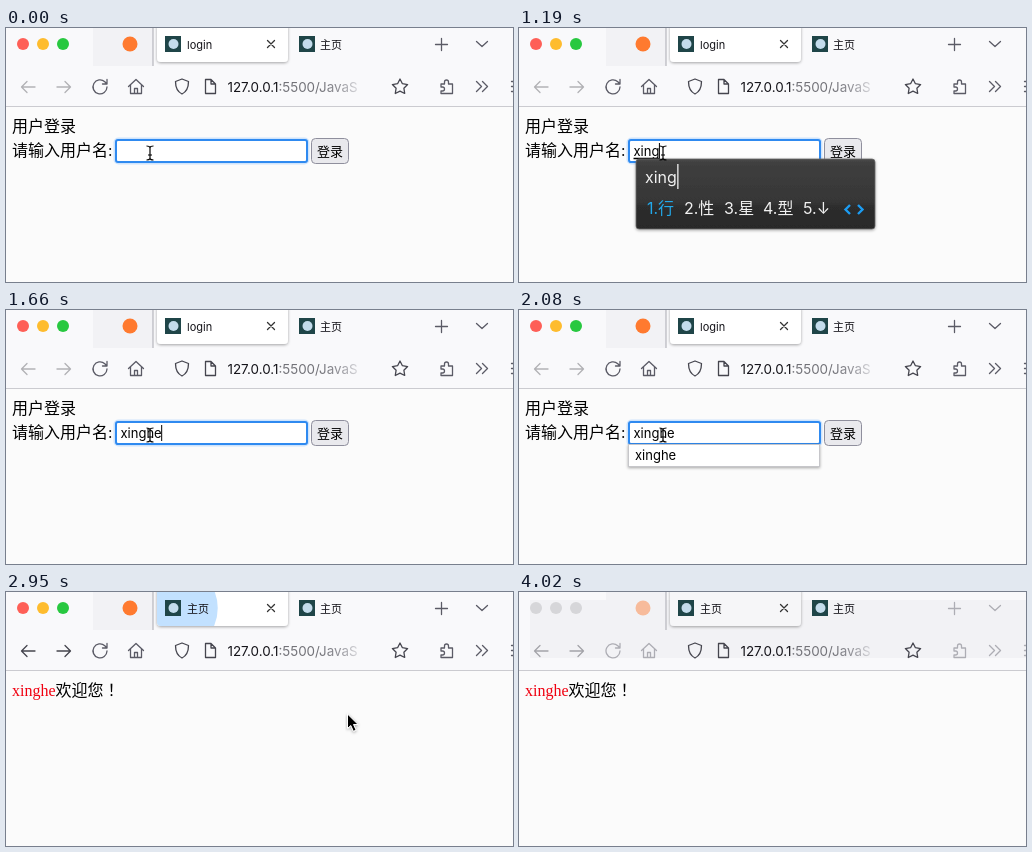
Recreate the animation shown at these times as an HTML page. Size 507 by 254 pixels, loop 4.12 s.

```html
<!DOCTYPE html>
<html lang="zh-CN">
<head>
<meta charset="utf-8">
<title>login</title>
<style>
html, body { margin: 0; width: 100%; height: 100%; overflow: hidden; background: #fbfbfb; }
svg { display: block; width: 100vw; height: 100vh; }
text { white-space: pre; }
.ui { font-family: Inter, "Noto Sans CJK SC", sans-serif; }
.page { font: 16px "Liberation Serif", "Noto Sans CJK SC", serif; }
.wide { font-family: "Noto Sans CJK TC", sans-serif; }
.ico { fill: none; stroke: #5b5b66; stroke-width: 1.3; stroke-linecap: round; stroke-linejoin: round; }
.bar { stroke: #45454e; }
</style>
</head>
<body>
<svg viewBox="0 0 507 254" xmlns="http://www.w3.org/2000/svg">
  <defs>
    <linearGradient id="dark" x2="0" y2="1">
      <stop offset="0" stop-color="#4a4a4a"/>
      <stop offset=".06" stop-color="#3f3f3f"/>
      <stop offset=".6" stop-color="#363636"/>
      <stop offset=".68" stop-color="#2d2d2d"/>
      <stop offset="1" stop-color="#282828"/>
    </linearGradient>
    <linearGradient id="fade" gradientUnits="userSpaceOnUse" x1="312" x2="355" y1="0" y2="0">
      <stop offset="0" stop-color="#737379"/>
      <stop offset=".5" stop-color="#929298"/>
      <stop offset="1" stop-color="#e4e4e8"/>
    </linearGradient>
    <filter id="soft" x="-20%" y="-40%" width="140%" height="190%">
      <feDropShadow dx="0" dy="1" stdDeviation="1.6" flood-opacity=".35"/>
    </filter>
    <clipPath id="tabClip"><rect x="151" y="-4" width="131" height="38" rx="4"/></clipPath>
    <clipPath id="urlClip"><rect x="215" y="44" width="138" height="30"/></clipPath>
    <g id="favicon">
      <rect width="16" height="16" fill="#1f4548"/>
      <circle cx="8.5" cy="8" r="5" fill="#c4dcec"/>
    </g>
  </defs>

  <rect width="507" height="254" fill="#fbfbfb"/>
  <rect width="507" height="78" fill="#f9f9fb"/>
  <rect x="87" width="60" height="38" fill="#f2f2f5"/>
  <rect id="inactive" x="11" y="8" width="496" height="58" fill="#f2f2f5"/>
  <path d="M0 78.5H507" stroke="#cbcbd0"/>
  <path d="M147 0V38" stroke="#a9a9b0"/>

  <g id="lights">
    <circle cx="17" cy="16" r="6" fill="#fe5f57"/>
    <circle cx="37" cy="16" r="6" fill="#febc2e"/>
    <circle cx="57" cy="16" r="6" fill="#28c840"/>
  </g>
  <g id="lightsOff" fill="#d6d6d9">
    <circle cx="17" cy="16" r="6"/><circle cx="37" cy="16" r="6"/><circle cx="57" cy="16" r="6"/>
  </g>

  <rect id="tab" x="151" y="-4" width="131" height="38" rx="4" filter="url(#soft)"/>
  <g clip-path="url(#tabClip)"><circle id="burst" cx="167" cy="16" fill="#0a84ff"/></g>
  <use href="#favicon" x="159" y="8"/>
  <text id="tabTitle" class="ui" x="181" y="20.5" font-size="11" fill="#15141a"></text>
  <path class="ico" d="M261.5 12.5l7 7m0-7l-7 7" style="stroke:#333"/>
  <use href="#favicon" x="293" y="8"/>
  <text class="ui" x="314" y="20.5" font-size="11" fill="#15141a">主页</text>

  <g id="chrome">
    <circle cx="124" cy="16" r="7.5" fill="#ff7a2f"/>
    <g class="ico">
      <path d="M429.5 16.5h12m-6-6v12M470.5 13.5l5.5 5 5.5-5"/>
      <path d="M101 59a7 7 0 1 1-2.2-5.2l2 2M101 51.5v4.5h-4.5"/>
      <path d="M122.5 58.5l7.5-7 7.5 7M124.5 57v8.5h11V57M128.5 65.5v-5h3v5"/>
      <path d="M435 56h3.5v-2a2 2 0 0 1 4 0v2h4v9.5H435V63h1.500a2 2 0 0 0 0-4H435z"/>
      <path d="M470.5 53.5l5 5-5 5m6-10l5 5-5 5M505.5 53.5h4m-4 5h4m-4 5h4"/>
    </g>
    <path id="back" class="ico bar" d="M29 59H15.5m5.5-5.5L15.5 59l5.5 5.5"/>
    <path id="forward" class="ico bar" d="M51 59h13.5M59 53.5l5.5 5.5-5.5 5.5"/>
  </g>

  <g class="ico bar">
    <path d="M176 51l6.5 2.5c0 6-1.5 10-6.5 12.5c-5-2.5-6.5-6.5-6.5-12.5z"/>
    <path d="M199.5 51.5h5.5l4.5 4.5v9.5h-10zM205 51.5v4.5h4.5"/>
    <path id="star"/>
  </g>
  <g clip-path="url(#urlClip)">
    <text class="ui" x="221.5" y="63.5" font-size="13.4" fill="#15141a">127.0.0.1<tspan fill="url(#fade)">:5500/JavaS</tspan></text>
  </g>

  <g id="login">
    <g class="page">
      <text x="6" y="104">用户登录</text>
      <text x="6" y="128">请输入用户名:</text>
    </g>
    <g id="focus">
      <rect x="107.5" y="109.5" width="196" height="27" rx="5" fill="#cfe4fc"/>
      <rect x="110" y="112" width="191" height="22" rx="2" fill="#fff" stroke="#2f8af0" stroke-width="2"/>
    </g>
    <rect id="blurred" x="110.5" y="112.5" width="190" height="21" rx="2" fill="#fff" stroke="#8f8f9d"/>
    <rect id="button" x="305.5" y="110.5" width="37" height="25" rx="4" stroke="#8f8f9d"/>
    <text class="ui" x="311" y="128" font-size="13">登录</text>
    <text id="field" class="ui" x="114.5" y="128" font-size="13"></text>
    <path id="underline" stroke="#000" stroke-width="1.5"/>
    <path id="caret" stroke="#000"/>
  </g>

  <g id="suggest">
    <rect x="109.5" y="134.5" width="191" height="22" fill="#fff" stroke="#c6c6ca" filter="url(#soft)"/>
    <text class="ui" x="116" y="150" font-size="13">xinghe</text>
  </g>

  <g id="ime" class="ui" font-size="16" fill="#f0f0f0">
    <rect id="panel" x="117" y="131" height="70" rx="3" fill="url(#dark)" stroke="#6a6a6a" stroke-width=".8" filter="url(#soft)"/>
    <text id="typed" x="126" y="155"></text>
    <path id="imeCaret" stroke="#fff" stroke-width="1.2"/>
    <g id="choices"></g>
    <path id="arrows" d="M6 177l-4.5 4.5 4.5 4.5m8-9l4.5 4.5-4.5 4.5" fill="none" stroke="#1c9cf2" stroke-width="2.4"/>
  </g>

  <text id="welcome" class="page" x="6" y="104"><tspan fill="#f00010">xinghe</tspan>欢迎您<tspan class="wide" lang="zh-TW">！</tspan></text>

  <path id="ibeam" d="M-3.5 -7q3 0 3.5 1.5q.5-1.5 3.5-1.5M0-5.5V5.5M-3.5 7q3 0 3.5-1.5q.5 1.5 3.5 1.5M-2 2h4" fill="none" stroke="#000" stroke-width="1.2"/>
  <path id="arrow" d="M0 0V14.5l3.3-3 2.6 5.8 2.7-1.2-2.6-5.6h4.6z" fill="#000" stroke="#fff" filter="url(#soft)"/>
</svg>
<script>
const LOOP = 4120;
const el = id => document.getElementById(id);
const set = (id, attrs) => { for (const k in attrs) el(id).setAttribute(k, attrs[k]); };
const show = (id, on) => { el(id).style.display = on ? "" : "none"; };
const held = (t, start, step) => start + Math.floor((t - start) / step) * step;

// start time, composed text, candidates
const typing = [
  [780, "x", "想下小写"],
  [900, "xi", "系西洗喜"],
  [1010, "xin", "新心信辛"],
  [1110, "xing", "行性星型"],
  [1300, "xing'h", ["信号", "型号", "行货", "星河"]],
  [1420, "xing'he", ["星河", "性和", "形合", "行贺"]]
];
const toButton = [[2080, 144, 125], [2130, 150, 126], [2300, 225, 130], [2460, 318, 125], [2590, 341.5, 122]];
const toExit = [[3290, 341.5, 122], [3350, 343, 128], [3410, 347, 140], [3550, 394, 185], [3650, 435, 220], [3750, 463, 256]];

function along(path, t) {
  if (t <= path[0][0]) return path[0].slice(1);
  for (let i = 1; i < path.length; i++) {
    const [a, x, y] = path[i - 1], [b, u, v] = path[i];
    if (t < b) {
      const p = (t - a) / (b - a);
      return [x + (u - x) * p, y + (v - y) * p];
    }
  }
  return path[path.length - 1].slice(1);
}

function starPath() {
  let d = "";
  for (let i = 0; i < 10; i++) {
    const r = i % 2 ? 4.1 : 8, a = i * Math.PI / 5 - Math.PI / 2;
    d += (i ? "L" : "M") + (394 + r * Math.cos(a)).toFixed(2) + " " + (59 + r * Math.sin(a)).toFixed(2);
  }
  return d + "z";
}

function drawIme(state) {
  show("ime", !!state);
  if (!state) return;
  const [, text, words] = state;
  const wide = words[0].length > 1;
  const xs = wide ? [128, 181, 237, 292, 348] : [128, 165, 205, 244, 284];
  set("panel", { width: wide ? 303 : 239 });
  set("arrows", { transform: `translate(${wide ? 389 : 325} 0)` });
  el("typed").textContent = text;
  const end = 127 + el("typed").getComputedTextLength();
  set("imeCaret", { d: `M${end} 136V161` });
  el("choices").innerHTML = [...words, wide ? "&lt;" : "↓"].map((w, i) =>
    `<text x="${xs[i]}" y="186"${i ? "" : ' fill="#22a9ea"'}>${i + 1}.${w}</text>`).join("");
}

function drawCursor(t) {
  const [x, y] = t < 2130 ? [144, 125]
    : t < 3290 ? along(toButton, held(t, 2130, 65.7) + 20)
    : along(toExit, t < 3410 ? held(t, 3290, 60) : held(t, 3410, 57));
  const inField = x < 302 && y < 135;
  show("ibeam", inField);
  show("arrow", !inField && t < 3750);
  set(inField ? "ibeam" : "arrow", { transform: `translate(${x} ${y})` });
}

function drawLogin(t, state) {
  const text = t < 780 ? "" : state ? state[1] : "xinghe";
  const pressed = t >= 2520;
  el("field").textContent = text;
  const end = 114.5 + (text ? el("field").getComputedTextLength() : 0);
  set("underline", { d: `M114.5 130.5H${end}` });
  set("caret", { d: `M${end} 115V131` });
  show("underline", !!state);
  show("caret", (t >= 60 && t < 600) || (t >= 780 && t < 2080));
  show("focus", !pressed);
  show("blurred", pressed);
  set("button", { fill: pressed && t < 2590 ? "#b1b1b9" : t > 2450 ? "#d0d0d7" : "#e9e9ed" });
}

function draw(t) {
  const home = t >= 2770, away = t >= 4020;
  const state = t < 1660 ? typing.filter(s => s[0] <= t).pop() : null;
  show("login", !home);
  show("welcome", home);
  show("suggest", t >= 1720 && t < 2520);
  if (!home) drawLogin(t, state);
  drawIme(state);
  drawCursor(t);

  el("tabTitle").textContent = home ? "主页" : "login";
  set("back", { opacity: home ? 1 : 0.4 });
  set("forward", { opacity: home ? 1 : 0.4 });
  const p = Math.max(0, Math.min(1, (held(t, 2770, 60) - 2890) / 400));
  set("burst", { r: p ? 20 + 165 * p : 0, opacity: 0.29 * (1 - p) });

  show("inactive", away);
  show("lights", !away);
  show("lightsOff", away);
  set("tab", { fill: away ? "#f6f6f8" : "#fff" });
  set("chrome", { opacity: away ? 0.45 : 1 });
}

set("star", { d: starPath() });
const begin = performance.now();
function tick() {
  draw((performance.now() - begin) % LOOP);
  requestAnimationFrame(tick);
}
tick();
</script>
</body>
</html>
```
